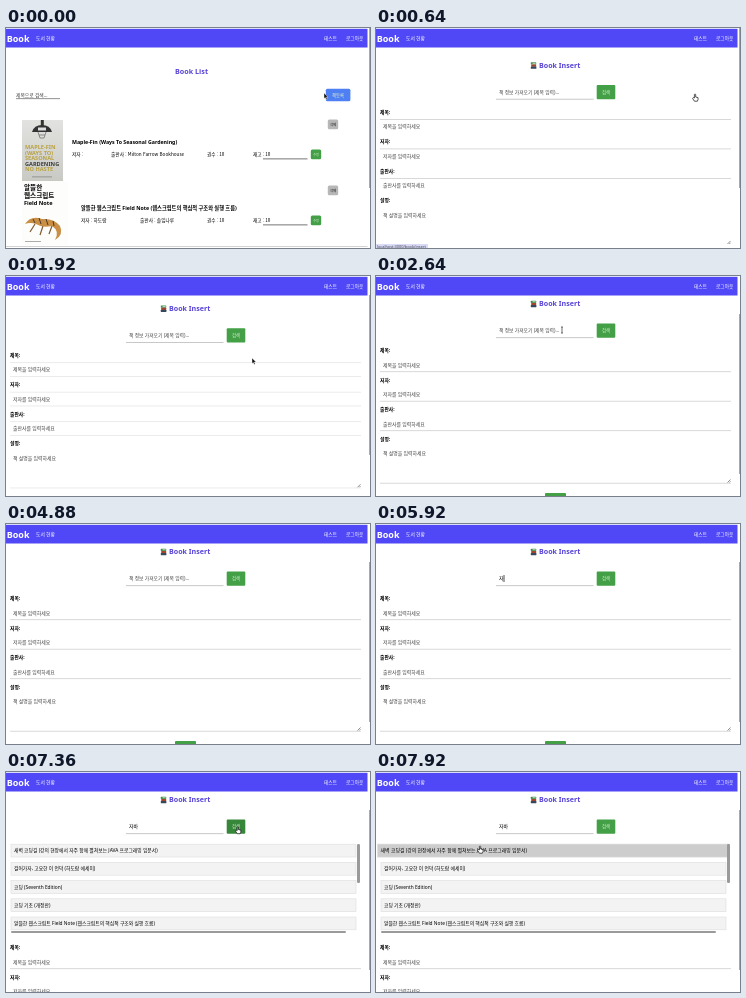
Write an HTML page that moves like this. It is 364 by 220 pixels and loops after 8 s.

```html
<!DOCTYPE html>
<html lang="ko">
<head>
<meta charset="utf-8">
<title>Book</title>
<style>
html, body { margin: 0; width: 100%; height: 100%; overflow: hidden; background: #fff; }
svg { display: block; width: 100vw; height: 100vh; }
text { font-family: "Noto Sans", "Noto Sans CJK KR", sans-serif; font-weight: 500; white-space: pre; }
.cjk { font-family: "Noto Sans CJK KR", "Noto Sans", sans-serif; }
.b { font-weight: 700; }
.black { font-weight: 900; }
.mid { text-anchor: middle; }
</style>
</head>
<body>
<svg id="stage" viewBox="0 0 364 220" preserveAspectRatio="none"></svg>
<script>
const LOOP = 8000, SCROLL = 9.5, SHIFT = 101;
const INK = '#000', HINT = '#444', GREEN = '#43a047', DARK_GREEN = '#37873b', PURPLE = '#5844d8';

const rect = (x, y, w, h, fill, extra = '') =>
  `<rect x="${x}" y="${y}" width="${w}" height="${h}" fill="${fill}" ${extra}/>`;
// y is the visual middle of the line
const text = (x, y, size, fill, str, cls = '', id = '') =>
  `<text ${id && `id="${id}"`} class="${cls}" x="${x}" y="${y + size * 0.36}" font-size="${size}" fill="${fill}">${str}</text>`;
const group = (id, body) => `<g id="${id}">${body}</g>`;

const header = rect(0, 0.8, 361.5, 18.7, '#5048f6') +
  text(0.7, 10.5, 9, '#fff', 'Book', 'b') +
  text(30, 10.2, 4.8, '#fff', '도서 현황') +
  text(318, 10.2, 4.7, '#fff', '테스트') +
  text(340, 10.2, 4.7, '#fff', '로그아웃');

function bookRow(x, y, title, author, pubX, publisher) {
  const line = y + 12;
  return text(x, y, 5.25, INK, title, 'b') +
    text(x, line, 4.7, INK, '저자 : ' + author, 'cjk') +
    text(pubX, line, 4.7, INK, '출판사 : ' + publisher, 'cjk') +
    text(201, line, 4.6, INK, '권수 : 10', 'cjk') +
    text(247, line + 0.6, 4.6, INK, '재고 : 10', 'cjk') +
    rect(257, line + 4.5, 44.5, 0.8, '#555') +
    rect(304.8, line - 4.4, 10.4, 9.6, GREEN, 'rx="1.5"') +
    text(310, line + 0.5, 3, '#e6f5e0', '수정', 'mid') +
    rect(321.8, y - 22.4, 10.4, 9.6, '#b7b7b7', 'rx="1.5"') +
    text(327, y - 17.5, 3.4, '#111', '삭제', 'mid');
}

function coverOne() {
  const words = ['MAPLE-FIN', '(WAYS TO)', 'SEASONAL', 'GARDENING', 'NO HASTE'];
  const gold = '#b9a23e', dark = '#3c3c3a';
  return '<linearGradient id="paper" x2="0" y2="1"><stop stop-color="#e2e2e0"/><stop offset="1" stop-color="#c9c9c4"/></linearGradient>' +
    rect(16, 92, 41, 61, 'url(#paper)') +
    rect(34.8, 92, 3, 6, '#333') +
    '<path d="M26 104Q28 97 36 97T46 104Z" fill="#333"/>' +
    rect(32, 99.5, 8, 3, '#ddd') +
    '<path d="M32 104L34 110H38L40 104M33 107H39" fill="none" stroke="#666" stroke-width=".7"/>' +
    words.map((w, i) => text(19, 119 + i * 5.6, 5.6, i === 3 ? dark : gold, w, 'b')).join('') +
    rect(26, 148.5, 20, 0.8, '#888');
}

function coverTwo() {
  return rect(16, 153, 46, 64, '#fdfdfc') +
    text(18, 160, 6.6, INK, '알뜰한', 'black') +
    text(18, 167.5, 6.6, INK, '웹스크립트', 'black') +
    text(18, 174.5, 5.6, INK, 'Field Note', 'b') +
    '<path d="M19 196Q25 187 36 191Q48 190 54 198Q58 207 49 212Q54 203 46 198Q36 200 30 196Q24 194 19 196Z" fill="#c98f45"/>' +
    '<path d="M29 196L24 204M37 198L34 207M46 198L43 206" fill="none" stroke="#7d5a30" stroke-width="1.2"/>' +
    '<path d="M27 191L29 195M33 190L35 196M40 191L42 197M47 193L48 198" stroke="#4b3a27"/>' +
    rect(19, 213, 16, 0.8, '#999');
}

const listPage = text(185.5, 43, 7.2, PURPLE, 'Book List', 'b mid') +
  text(10, 67, 4.8, HINT, '제목으로 검색...') +
  rect(10, 70.3, 44, 0.8, '#777') +
  rect(319.8, 60.8, 24.6, 12.4, '#4f80f3', 'rx="1.5"') +
  text(332, 67, 4.4, '#e6f0cf', '책등록', 'mid') +
  coverOne() + coverTwo() +
  bookRow(66, 114, 'Maple-Fin (Ways To Seasonal Gardening)', '', 105, 'Milton Farrow Bookhouse') +
  bookRow(75, 180, '알뜰한 웹스크립트 Field Note (웹스크립트의 핵심적 구조와 실행 흐름)', '하도람', 134, '솔잎나루') +
  rect(0, 218.2, 361.5, 0.8, '#c8c8c8');

const fields = [['제목', '제목을 입력하세요'], ['저자', '저자를 입력하세요'],
  ['출판사', '출판사를 입력하세요'], ['설명', '책 설명을 입력하세요']];

const edges = (id, offsets) => group(id, offsets.map(y => rect(4, y, 351, 0.8, '#cfcfcf')).join(''));
const form = fields.map(([name, hint], i) => {
    const y = 84 + i * 29.5;
    return text(4, y, 4.8, INK, name + ':', 'b') + text(7, y + 14.4, 4.9, HINT, hint);
  }).join('') +
  edges('tops', [91, 120.5, 150]) +
  edges('bottoms', [104.8, 134.3, 163.8, 216.3]) +
  '<path d="M351.5 216L354.5 213M353.3 216L354.5 214.8" stroke="#444" stroke-width=".6"/>' +
  rect(169, 226.5, 21, 14, GREEN, 'rx="1"');

const bookIcon = rect(154.8, 34.2, 5.4, 2.4, '#3f8f4f', 'rx=".5"') +
  rect(155.2, 36.4, 5, 2.3, '#a5432f', 'rx=".5"') +
  rect(154.8, 38.5, 5.6, 2.3, '#35485c', 'rx=".5"') +
  rect(156.6, 34.9, 3, 0.8, '#e4e4d8');

const insertPage = bookIcon + text(163, 37.2, 7.1, PURPLE, 'Book Insert', 'b') +
  text(123, 64.2, 4.8, HINT, '책 정보 가져오기 (제목 입력)...', '', 'hint') +
  text(123, 64.2, 4.9, INK, '', '', 'typed') +
  rect(123, 60.5, 0.8, 7, '#222', 'id="caret"') +
  rect(120, 70.8, 97.5, 0.8, '#bbb') +
  rect(220.7, 57, 18.6, 14.2, GREEN, 'rx="1" id="search"') +
  text(230, 64.2, 4.4, '#dff0d8', '검색', 'mid') +
  group('form', form);

const results = ['새벽 코딩길 (강의 현장에서 자주 함께 펼쳐보는 JAVA 프로그래밍 입문서)',
  '걸어가자, 고요한 이 언덕 (하도람 에세이)', '코딩 (Seventh Edition)', '코딩 기초 (개정판)',
  '알뜰한 웹스크립트 Field Note (웹스크립트의 핵심적 구조와 실행 흐름)'];
const rowY = i => 78.5 + i * 18.2;
const resultList = results.map((title, i) => group('row' + i,
    rect(5, rowY(i) - 6.3, 345, 12.8, '#f3f3f3', 'stroke="#ddd" stroke-width=".6"') +
    text(8, rowY(i), 4.82, INK, title))).join('') +
  rect(351, 72, 3, 39, '#9a9a9a', 'rx="1.2"') +
  rect(5, 159, 335, 2, '#9a9a9a', 'rx="1"');

const hand = '<path d="M-.6-2.6Q.2-3.4.7-2.5V0L3 .6Q3.4 2.6 2.4 4.2H-.6L-2.4 1.4Q-2-.1-.6 1Z" fill="#fff" stroke="#111" stroke-width=".7"/>';
const arrow = '<path d="M-1-3V2.6L.3 1.5 1.3 3.6 2.2 3.1 1.3 1.1H3Z" fill="#111" stroke="#fff" stroke-width=".4"/>';
const beam = '<path d="M-1-3H1M0-3V3M-1 3H1" fill="none" stroke="#333" stroke-width=".7"/>';

document.getElementById('stage').innerHTML = rect(0, 0, 364, 220, '#fff') +
  group('list', listPage) + group('insert', insertPage) + group('results', resultList) +
  header + rect(363, 0, 1, 160, '#a9a9b2', 'id="thumb"') +
  group('status', rect(0, 216, 52, 4, '#d9dbf6') + text(1, 218.2, 3.9, '#445', 'localhost:3000/book/insert')) +
  group('mouse', group('hand', hand) + group('arrow', arrow) + group('beam', beam));

const el = {};
document.querySelectorAll('[id]').forEach(n => el[n.id] = n);
const show = (id, on) => el[id].setAttribute('visibility', on ? 'inherit' : 'hidden');
const move = (id, x, y) => el[id].setAttribute('transform', `translate(${x} ${y})`);

// [time, ...values]
const mousePath = [[0, 319, 68], [400, 319, 69], [1240, 319, 69], [1600, 247, 85],
  [2440, 247, 85], [2640, 186, 54], [6640, 190, 56], [6840, 232, 57.5], [7360, 232, 57.5],
  [7600, 190, 66], [7880, 104, 77]];
const scrollPath = [[1760, 0], [1920, 4.7], [2080, SCROLL]];
const cursors = [[0, 'arrow'], [400, 'hand'], [1240, 'arrow'], [2560, 'beam'], [3120, ''],
  [6640, 'beam'], [6760, 'hand'], [7440, 'arrow'], [7760, 'hand']];
const typing = [[0, ''], [5760, 'ㅈ'], [5920, '자'], [6160, '잡'], [6320, '자바']];

const step = (table, t) => table.filter(r => r[0] <= t).pop()[1];
function tween(table, t) {
  const i = table.findIndex(r => r[0] > t);
  if (i < 0) return table[table.length - 1].slice(1);
  if (!i) return table[0].slice(1);
  const [a, b] = [table[i - 1], table[i]], k = (t - a[0]) / (b[0] - a[0]);
  return a.slice(1).map((v, j) => v + (b[j + 1] - v) * k);
}

function draw(t) {
  const [mx, my] = tween(mousePath, t), [scroll] = tween(scrollPath, t);
  const inserted = t >= 400, found = t >= 7120, typed = step(typing, t), cursor = step(cursors, t);

  show('list', !inserted);
  show('insert', inserted);
  show('results', found);
  show('status', inserted && t < 1040);
  move('insert', 0, -scroll);
  move('form', 0, found ? SHIFT : 0);
  move('thumb', 0, scroll * 4);
  // hairline edges trade places as the page scrolls
  el.tops.setAttribute('opacity', 1 - scroll / SCROLL);
  el.bottoms.setAttribute('opacity', scroll / SCROLL);

  el.typed.textContent = typed;
  show('hint', !typed);
  const blink = t >= 3120 && t < 6720 && Math.floor((t - 3120) / 480) % 2 === 0;
  show('caret', typed ? t < 6640 : blink);
  move('caret', typed.length * 4.6, 0);

  const overSearch = cursor === 'hand' && mx > 221 && mx < 239 && my < 62;
  el.search.setAttribute('fill', overSearch ? DARK_GREEN : GREEN);

  results.forEach((_, i) => {
    const row = el['row' + i], y = rowY(i), k = 1.02;
    const hover = found && Math.abs(my - y) < 6.4;
    row.firstChild.setAttribute('fill', hover ? '#cdcdcd' : '#f3f3f3');
    row.setAttribute('transform', hover ? `translate(${177.5 * (1 - k)} ${y * (1 - k)}) scale(${k})` : '');
  });

  ['hand', 'arrow', 'beam'].forEach(c => show(c, c === cursor));
  move('mouse', mx, my);
}

const start = performance.now();
function tick() {
  draw((performance.now() - start) % LOOP);
  requestAnimationFrame(tick);
}
tick();
</script>
</body>
</html>
```
